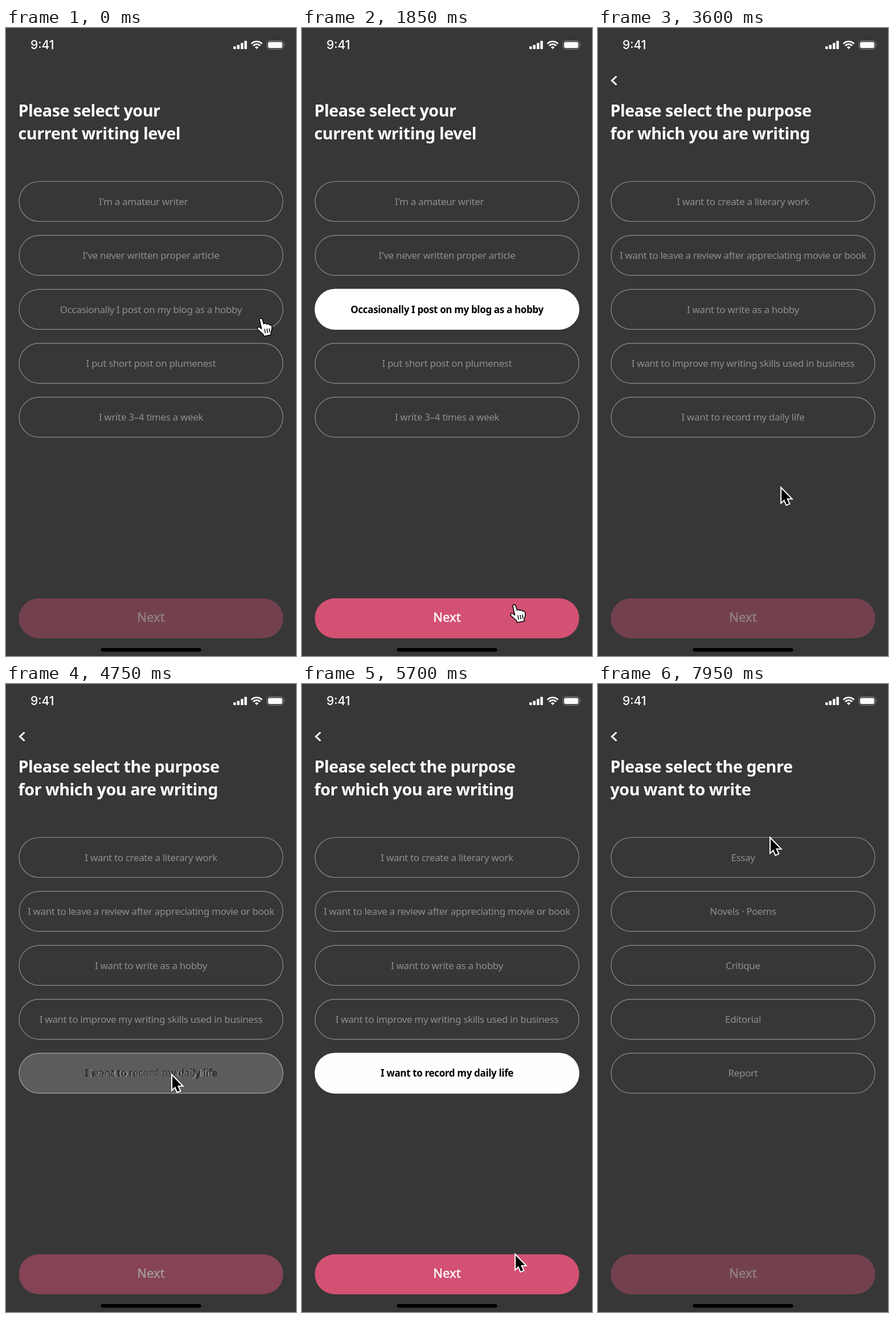
Animation of 509x1099 px, one loop 8000 ms. Source, as an HTML page:

```html
<!DOCTYPE html>
<html lang="en">
<head>
<meta charset="utf-8">
<title>Writing onboarding</title>
<style>
  html, body { margin: 0; width: 100%; height: 100%; overflow: hidden; background: #373737; }
  svg { display: block; font-family: "Noto Sans", "Open Sans", sans-serif; }
  .title { font-size: 28.7px; font-weight: 600; letter-spacing: -.45px; fill: #fff; }
  .option { font-size: 17px; letter-spacing: -.35px; text-anchor: middle; fill: #8e8e8e; }
  .picked { font-weight: 600; fill: #000; }
  .blend { isolation: isolate; }
  .blend > * { mix-blend-mode: plus-lighter; }
  .next { font-size: 22px; font-weight: 500; text-anchor: middle; stroke-width: .5; }
  .clock { font: 500 21px Inter, sans-serif; fill: #fff; }
  .line { fill: none; stroke: #fff; }
</style>
</head>
<body>
<svg width="509" height="1099" viewBox="0 0 509 1099">
  <rect width="509" height="1099" fill="#373737"/>
  <text class="clock" x="43" y="36.5">9:41</text>
  <g fill="#fff">
    <rect x="399" y="32" width="4.5" height="5" rx="1"/>
    <rect x="405.5" y="29.5" width="4.5" height="7.5" rx="1"/>
    <rect x="412" y="26" width="4.5" height="11" rx="1"/>
    <rect x="418.3" y="22.5" width="4.5" height="14.5" rx="1"/>
    <path d="M440 37l-3.3-3.4a4.7 4.7 0 0 1 6.6 0z"/>
    <rect x="460" y="24.5" width="25" height="10.5" rx="2.5"/>
  </g>
  <path class="line" stroke-width="2.8" d="M430.6 27.6a13.3 13.3 0 0 1 18.8 0M433.8 31a8.8 8.8 0 0 1 12.4 0"/>
  <rect x="458" y="22.5" width="29" height="14.5" rx="4.5" fill="none" stroke="#8b8b8b"/>
  <path d="M488.6 27.5q2 2.2 0 4.5z" fill="#8b8b8b"/>
  <path id="back" class="line" stroke-width="3" d="M32.5 84.5L24.5 92L32.5 99.5"/>
  <g id="titles" class="blend"></g>
  <g id="frames" fill="none" stroke="#8e8e8e" stroke-width="1.2"></g>
  <g id="options" class="blend"></g>
  <g id="picks"></g>
  <rect id="button" x="22.5" y="998" width="464" height="70" rx="35"/>
  <text id="label" class="next" x="254.5" y="1039">Next</text>
  <rect x="166.5" y="1085" width="176" height="6.5" rx="3.2"/>
  <g id="cursor">
    <path id="arrow" fill="#000" stroke="#fff" stroke-width="4" paint-order="stroke"
      d="M2 4V27L7 22.5L10.8 31.5L15 29.7L11 20.8H18.3Z"/>
    <g id="hand" transform="translate(-7 -2)" stroke="#000" stroke-width="1.5" stroke-linejoin="round">
      <path fill="#fff" d="M5 4C4 1 9 0 10 3L12.5 11C13.5 9 17 9.5 17.5 11.5C19 9.8 22 10.5 22.5 12.8C24 12 26.5 13 26.8 15.5C27.5 20 26 23 25 26V30L12.5 32.5L11.5 29C8 26 4 23 1.5 20C0 17 3 15.5 5.5 17L8.5 19.5Z"/>
      <path d="M14 19.5l1.2 7.5M18 19l1 7.5M22 18.5l.7 7"/>
    </g>
  </g>
</svg>
<script>
const $ = id => document.getElementById(id);
const LOOP = 8;
const screens = [
  { title: ["Please select your", "current writing level"], pick: 2,
    options: ["I'm a amateur writer", "I've never written proper article",
      "Occasionally I post on my blog as a hobby", "I put short post on plumenest", "I write 3–4 times a week"] },
  { title: ["Please select the purpose", "for which you are writing"], pick: 4,
    options: ["I want to create a literary work", "I want to leave a review after appreciating movie or book",
      "I want to write as a hobby", "I want to improve my writing skills used in business", "I want to record my daily life"] },
  { title: ["Please select the genre", "you want to write"],
    options: ["Essay", "Novels · Poems", "Critique", "Editorial", "Report"] }
];

function add(parent, tag, attrs, text = "") {
  const el = document.createElementNS("http://www.w3.org/2000/svg", tag);
  for (const key in attrs) el.setAttribute(key, attrs[key]);
  el.textContent = text;
  return parent.appendChild(el);
}
const rowY = i => 268.5 + i * 94.4;
const pill = (parent, i, attrs) =>
  add(parent, "rect", { x: 23, y: rowY(i), width: 463, height: 70, rx: 35, ...attrs });
const optionText = (parent, i, text, cls, x = 254.5) =>
  add(parent, "text", { class: cls, x, y: rowY(i) + 41.3 }, text);

screens.forEach((s, n) => {
  s.heading = add($("titles"), "g", { class: "title" });
  s.title.forEach((line, i) => add(s.heading, "text", { x: 21.5, y: 155 + i * 39.5 }, line));
  s.texts = s.options.map((text, i) =>
    optionText($("options"), i, text, "option", n + i ? 254.5 : 241));
  if (s.pick === undefined) return;
  s.picked = add($("picks"), "g", {});
  pill(s.picked, s.pick, { fill: "#fff", stroke: "#fff", "stroke-width": 1.4 });
  optionText(s.picked, s.pick, s.options[s.pick], "option picked");
});
for (let i = 0; i < 5; i++) pill($("frames"), i, {});

// Overdamped spring: stiffness 80, damping 20, mass 1
function spring(t) {
  if (t <= 0) return 0;
  const r = Math.sqrt(20), a = 10 - r, b = 10 + r;
  return 1 - (b * Math.exp(-a * t) - a * Math.exp(-b * t)) / (b - a);
}
const mix = (a, b, p) => a + (b - a) * p;
const mixColor = (a, b, p) => `rgb(${a.map((v, i) => mix(v, b[i], p))})`;
const clamp = v => Math.min(1, Math.max(0, v));
const easeOut = p => 1 - (1 - p) ** 2.4;
const easeInOut = p => p * p * (3 - 2 * p);

// start, end, x, y, easing
const moves = [
  [1.1, 1.75, 372, 1010, easeInOut],
  [3.1, 3.95, 290, 682, easeInOut],
  [5.175, 5.9, 377, 1011, easeOut],
  [7.42, 7.95, 301, 267, easeInOut]
];
const handTimes = [[0, .64], [1.65, 2.2], [3.85, 4.68], [6.24, 6.55]];

function draw(t) {
  const [pick1, page1, pick2, page2] = [.62, 2.18, 4.66, 6.53].map(start => spring(t - start));
  const shown = [1 - page1, page1 - page2, page2];
  const chosen = [pick1 - page1, pick2 - page2, 0];
  screens.forEach((s, n) => {
    s.heading.style.opacity = shown[n];
    s.texts.forEach((el, i) => el.style.opacity = i === s.pick ? shown[n] - chosen[n] : shown[n]);
    if (s.picked) s.picked.style.opacity = chosen[n];
  });
  $("back").style.opacity = page1;
  const active = chosen[0] + chosen[1];
  $("button").style.fill = mixColor([115, 64, 78], [211, 81, 115], active);
  const labelColor = mixColor([143, 129, 130], [255, 255, 255], active);
  $("label").style.fill = $("label").style.stroke = labelColor;

  let x = 447, y = 509;
  for (const [start, end, toX, toY, ease] of moves) {
    const p = ease(clamp((t - start) / (end - start)));
    x = mix(x, toX, p);
    y = mix(y, toY, p);
  }
  $("cursor").setAttribute("transform", `translate(${x} ${y})`);
  const pointing = handTimes.some(([a, b]) => t >= a && t < b);
  $("hand").style.display = pointing ? "" : "none";
  $("arrow").style.display = pointing ? "none" : "";
}

const began = performance.now();
(function tick() {
  draw((performance.now() - began) / 1000 % LOOP);
  requestAnimationFrame(tick);
})();
</script>
</body>
</html>
```
